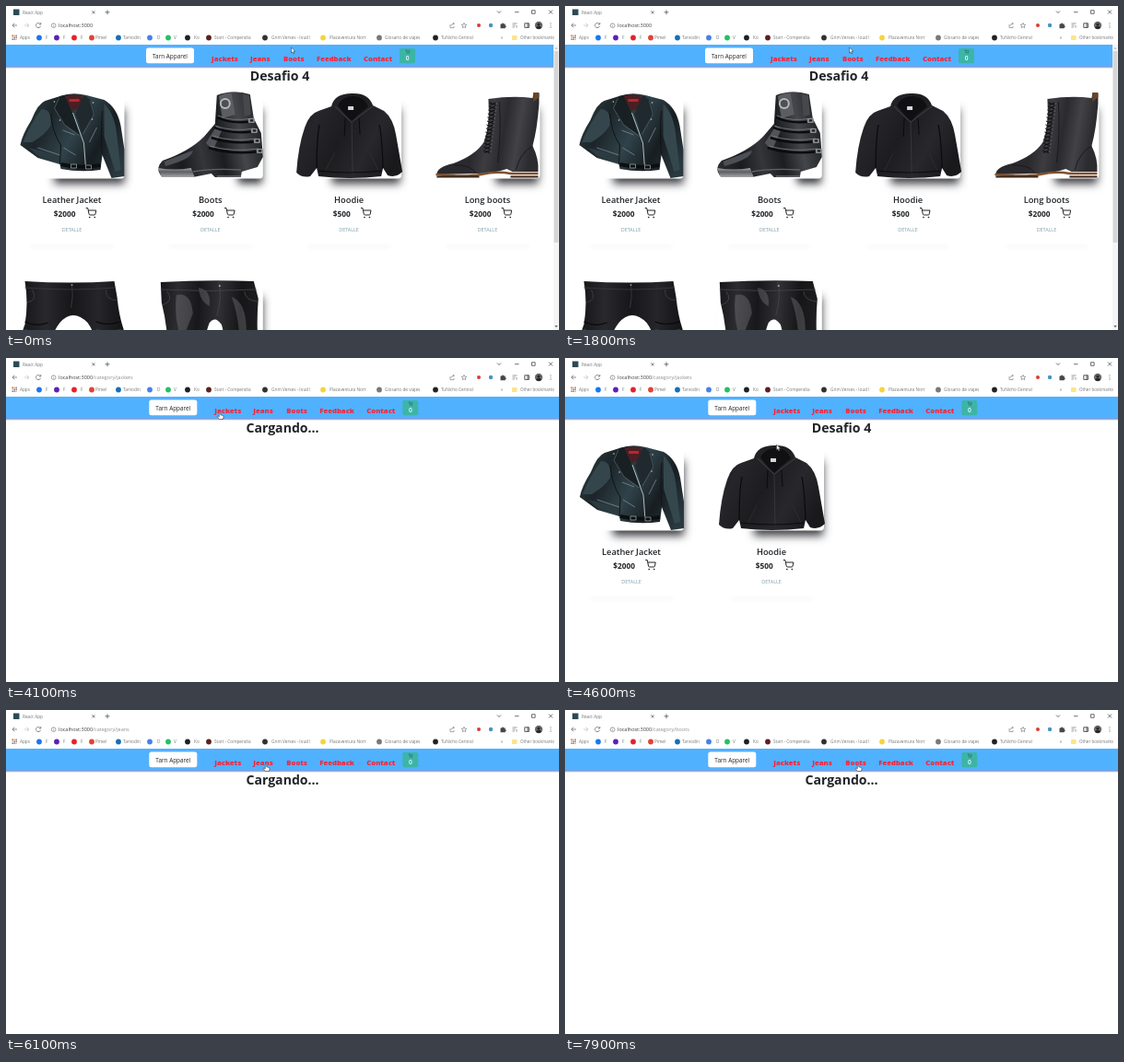
Write an HTML page with a canvas that moves like this. It is 600x352 px and loops after 8 s.

```html
<!DOCTYPE html>
<html lang="es">
<head>
<meta charset="utf-8">
<title>Desafio 4</title>
<style>
html, body { margin: 0; width: 100%; height: 100%; overflow: hidden; background: #fff; }
canvas { display: block; }
</style>
</head>
<body>
<canvas id="stage" width="600" height="352"></canvas>
<script>
const ctx = document.getElementById('stage').getContext('2d');
const LOOP = 8000;
const FONT = '"Open Sans", "Noto Sans", sans-serif';
const INK = '#212529';

function text(str, x, y, size, color = INK, weight = 400, align = 'left') {
  ctx.font = `${weight} ${size}px ${FONT}`;
  ctx.textAlign = align;
  ctx.fillStyle = color;
  ctx.fillText(str, x, y);
}
function rect(x, y, w, h, color, r = 0) {
  ctx.fillStyle = color;
  ctx.beginPath();
  ctx.roundRect(x, y, w, h, r);
  ctx.fill();
}
function dot(x, y, r, color) {
  ctx.fillStyle = color;
  ctx.beginPath();
  ctx.arc(x, y, r, 0, Math.PI * 2);
  ctx.fill();
}
function fill(d, color) {
  ctx.fillStyle = color;
  ctx.fill(new Path2D(d));
}
function line(d, color, width = 0.8) {
  ctx.strokeStyle = color;
  ctx.lineWidth = width;
  ctx.stroke(new Path2D(d));
}
function at(x, y, draw, scale = 1) {
  ctx.save();
  ctx.translate(x, y);
  ctx.scale(scale, scale);
  draw();
  ctx.restore();
}
function blend(x0, y0, x1, y1, ...colors) {
  const g = ctx.createLinearGradient(x0, y0, x1, y1);
  colors.forEach((c, i) => g.addColorStop(i / (colors.length - 1), c));
  return g;
}
// Blurred rectangle without its sharp body.
function shade(x, y, w, h, blur, color) {
  ctx.save();
  ctx.shadowColor = color;
  ctx.shadowBlur = blur;
  ctx.shadowOffsetX = 2000;
  ctx.fillRect(x - 2000, y, w, h);
  ctx.restore();
}

function jacket() {
  fill('M44 4 Q57-1 73 3 L92 8 Q106 16 110 36 L114 62 L114 91 L100 93 L90 68 L88 84 Q66 87 45 83 L44 78 L20 71 L1 57 Q3 46 13 30 Q20 12 28 9Z',
    blend(0, 20, 110, 80, '#2c3d42', '#1c2529', '#30434a', '#171d21', '#2a393f'));
  fill('M24 18 Q36 18 34 36 Q28 46 14 54 L4 54 Q12 34 24 18Z', '#34464c');
  fill('M92 12 Q104 24 106 48 L110 84 L104 86 L92 48Z', '#34474d');
  fill('M10 60 L44 68 L44 76 L22 70Z', '#2b3b40');
  fill('M48 4 Q58 0 69 5 L66 18 L53 20Z', '#4a1f24');
  fill('M54 7 H65 V10 H54Z', '#b8272c');
  fill('M44 4 L49 3 L57 21 L66 46 L48 34 L38 17Z', '#182023');
  fill('M70 3 L78 9 L82 24 L68 45 L61 23Z', '#20292d');
  line('M43 6 L38 17 L49 35 L65 47 M77 9 L81 24 L69 45', '#59686d', 0.7);
  line('M58 22 L70 55 L72 82', '#b5bec1', 1);
  line('M47 41 L60 46 M84 38 L76 54 M48 60 L61 68 M20 60 L44 68', '#7c8b90', 0.8);
  line('M34 23 Q36 44 45 57 L44 78 M90 20 Q88 48 90 66', '#0f1416', 1);
  line('M45 78 Q65 83 88 79', '#0b0f11', 4);
  line('M56 78 h6 v4 h-6z M72 79 h6 v4 h-6z', '#a9b0b2', 0.7);
  [[38, 10], [80, 11], [44, 30], [79, 29]].forEach(([x, y]) => dot(x, y, 0.8, '#c3cccf'));
}

function boots() {
  fill('M64 3 Q82-4 100 2 L104 28 L112 44 L114 70 L108 81 L91 86 L90 92 L62 92 L58 88 L38 92 L3 90 Q-3 82 5 74 Q34 64 50 48 L62 34Z',
    blend(0, 60, 112, 40, '#2b2c30', '#1a1b1e', '#34363a', '#1c1d20', '#44464b', '#222326'));
  fill('M66 4 Q74 0 80 1 L84 24 L70 28Z', '#5b5d62');
  fill('M92 2 L99 3 L101 24 L94 26Z', '#46484c');
  fill('M7 75 Q26 67 38 63 Q38 72 8 80Z', '#4c4f55');
  fill('M52 55 L64 36 L70 40 L60 62Z', '#505359');
  fill('M0 82 Q18 85 36 82 L40 92 L4 92Z', blend(0, 80, 0, 92, '#cfd1d3', '#5b5e62', '#a4a6a9'));
  line('M38 86 Q58 82 90 84', '#606368', 1.4);
  line('M64 91 H90', '#77797d', 1.2);
  for (let i = 0; i < 4; i++) {
    const y = 27 + i * 11;
    line(`M${64 - i * 3} ${y} Q80 ${y + 8} ${104 + i * 2} ${y + 4}`, '#0a0b0d', 2.4);
    line(`M${65 - i * 3} ${y - 2} Q80 ${y + 5} ${103 + i * 2} ${y + 1}`, '#74777c', 0.9);
    rect(98 + i * 3, y + 1, 7, 5, '#8b8e92', 1);
    rect(100 + i * 3, y + 2.2, 3.4, 2.4, '#202226');
  }
  dot(73, 12, 6, '#b5b7b9');
  dot(73, 12, 4, '#4c4f53');
}

function hoodie() {
  fill('M38 15 Q41 1 60 1 Q78 0 83 14 L95 20 Q105 28 108 46 L115 86 Q108 93 99 90 L94 82 L92 91 Q58 95 24 91 L22 82 L15 91 Q6 93 0 87 Q2 58 9 38 Q14 23 24 20Z',
    blend(0, 0, 114, 60, '#1b1b1e', '#26262a', '#1d1d20', '#28282c', '#19191c'));
  fill('M45 14 Q50 4 61 4 Q73 4 78 15 L66 25 L60 32 L53 24Z', '#101012');
  fill('M56 15 h6 v4 h-6z', '#d6d7d8');
  line('M42 15 Q52 25 60 32 Q70 24 83 15', '#38383c', 1.2);
  line('M60 32 L61 89', '#3c3c41', 0.8);
  line('M53 28 L52 48 M68 28 L69 46', '#0a0a0c', 1);
  line('M41 66 L31 86 M80 66 L89 85', '#303034', 0.8);
  line('M24 85 Q58 89 92 85 M22 82 Q22 50 25 35 M94 82 Q93 50 90 35', '#0b0b0d', 1.2);
}

function longBoots() {
  fill('M58 7 Q84 3 106 6 L107 0 L113 1 L113 12 Q111 40 106 58 Q113 72 112 86 L84 86 L78 83 Q64 88 46 88 L2 89 Q2 81 20 77 Q44 68 53 54 Q60 36 58 7Z',
    blend(50, 0, 112, 10, '#2a2a2e', '#3c3c41', '#2b2b2f', '#424247', '#2c2c30'));
  fill('M107 0 h6 v5 l-6 5z', '#6b4427');
  line('M1 89 Q34 92 50 89 Q67 85 82 88 H112', '#7d5230', 2.4);
  line('M2 91.4 H48 M82 91.4 H112', '#3b2414', 2);
  for (let i = 0; i < 14; i++) {
    const y = 11 + i * 4, x = 59 - i * 0.5;
    line(`M${x} ${y} l7 2.6 M${x + 7} ${y} l-6 2.6`, '#0c0c0e', 1);
    dot(x + 8, y + 1, 0.6, '#7b7c81');
  }
  line('M70 10 Q72 46 68 76 M106 58 Q92 66 88 84 M20 79 Q38 78 44 87', '#18181b', 0.9);
}

function blackJeans() {
  fill('M6 1 Q56 4 103 1 L106 18 Q108 38 113 53 Q116 76 114 92 L84 92 Q86 62 74 46 Q58 30 44 46 Q31 62 33 92 L2 92 Q-2 68 6 48 Q10 25 6 1Z',
    blend(0, 0, 114, 0, '#151518', '#28282d', '#17171a', '#25252a', '#131316'));
  line('M6 8 Q56 12 104 8', '#3c3c42', 0.8);
  line('M57 4 Q59 18 56 30 M14 10 Q20 22 9 24 M94 10 Q93 21 106 22', '#45454b', 0.7);
  for (let i = 0; i < 6; i++) {
    const y = 45 + i * 8;
    line(`M${6 - i * 0.8} ${y} q12 6 25 1 M${83 + i * 0.4} ${y} q12 5 27 0`, i % 2 ? '#37373d' : '#08080a', 1.2);
  }
  dot(57, 5, 1, '#8e8e94');
}

function leatherJeans() {
  fill('M3 2 Q54 -1 104 1 L109 20 Q106 55 111 88 Q92 92 73 88 Q73 60 69 48 Q62 38 56 46 Q49 64 48 93 L10 92 Q13 60 4 24Z',
    blend(0, 0, 114, 8, '#141416', '#2c2c30', '#18181b', '#303034', '#161618', '#202023'));
  const gloss = 'rgba(150,150,155,.3)';
  fill('M20 16 Q36 12 38 36 L26 66 Q17 42 20 16Z', gloss);
  fill('M80 18 Q97 24 96 60 L88 76 Q90 46 80 18Z', gloss);
  fill('M44 8 Q58 10 56 28 Q46 24 44 8Z', gloss);
  line('M3 10 Q54 13 107 10 M66 2 Q70 18 64 38', '#46464b', 0.8);
  line('M10 12 Q18 22 5 27 M94 12 Q95 22 108 23 M14 72 q16 6 32 2 M75 70 q14 6 32 2 M13 82 q14 4 32 1', '#47474c', 0.8);
  dot(67, 6, 1.1, '#a4a4a8');
}

// span: horizontal reach of the shadow under each picture
const JACKET = { name: 'Leather Jacket', price: '$2000', draw: jacket, span: [[37, 114]] };
const BOOTS = { name: 'Boots', price: '$2000', draw: boots, span: [[87, 113]] };
const HOODIE = { name: 'Hoodie', price: '$500', draw: hoodie, span: [[38, 113]] };
const LONG = { name: 'Long boots', price: '$2000', draw: longBoots, span: [[66, 113]] };
const BLACK = { name: 'Black Jeans', price: '$800', draw: blackJeans, span: [[12, 32], [70, 104]] };
const LEATHER = { name: 'Leather Jeans', price: '$1200', draw: leatherJeans, span: [[9, 114]] };

const cart = color => {
  line('M1 1h4l2.7 13.4a2 2 0 0 0 2 1.6h9.7a2 2 0 0 0 2-1.6L23 6H6', color, 2);
  dot(9, 21, 1.7, color);
  dot(20, 21, 1.7, color);
};

function card(item, cx, y) {
  at(cx - 57, y, () => {
    for (const [a, b] of item.span) shade(a, 18, b - a, 81, 9, 'rgba(25,27,33,.85)');
    rect(0, 0, 114, 93.5, '#fff', 4);
    item.draw();
  });
  shade(cx - 45, y + 167.3, 90, 0.7, 4, 'rgba(0,0,0,.14)');
  text(item.name, cx, y + 119.5, 9.3, INK, 600, 'center');
  ctx.font = `700 8.3px ${FONT}`;
  const w = ctx.measureText(item.price).width;
  const left = cx + 3.7 - (w + 23) / 2;
  text(item.price, left, y + 134.5, 8.3, INK, 700);
  at(left + w + 10.7, y + 125, () => cart(INK), 0.5);
  text('DETALLE', cx, y + 151, 5.4, '#7d9aaa', 400, 'center');
}

const marks = [
  [36, '#1877f2', 'F', 43], [55, '#5f1fb5', 'F', 62], [74, '#e8222b', 'F', 81],
  [93, '#df4436', 'Pimel', 97], [122, '#1470b8', 'Tarvodin', 127], [156, '#4a80e8', 'D', 164],
  [176, '#25c25f', 'V', 182], [197, '#1d2125', 'Ko', 204], [220, '#5c211e', 'Start - Compendia', 226],
  [281, '#35322e', 'Grim Verses - loud l', 288], [344, '#f5d343', 'Plazaventura Nort', 351],
  [405, '#77797c', 'Glosario de viajes', 411], [466, '#202225', 'TuNicho Central', 472]
];

function browser(path) {
  rect(0, 0, 600, 42, '#fff');
  const gray = '#6c7075', label = '#72767a';
  rect(8, 3.5, 6.5, 6.5, '#2c4a55');
  text('React App', 18, 8.7, 4.7, label);
  line('M93.4 5.3l3 3m0-3l-3 3 M107.5 6.8h5 M110 4.3v5', '#3c4043', 0.7);
  line('M533 5.5l2 2 2-2 M552 6.7h4.5 M570.5 4.7h3.6v3.6h-3.6z M589 4.5l4 4m0-4l-4 4', '#333', 0.7);

  line('M12 21H7m2.3-2.3L7 21l2.3 2.3', gray);
  line('M20 21h5m-2.3-2.3L25 21l-2.3 2.3', '#c3c6c9');
  line('M37.3 19.6a2.6 2.6 0 1 0 .3 2.2 M37.8 18v2h-2', gray);
  line('M54 21.2a2.4 2.4 0 1 1-4.8 0a2.4 2.4 0 1 1 4.8 0 M51.6 20.8v1.7 M51.6 19.4v.6', gray, 0.6);
  text('localhost:3000', 57, 23.2, 5.5, '#3a3d41');
  const hostWidth = ctx.measureText('localhost:3000').width;
  text(path, 57 + hostWidth, 23.2, 5.5, '#8a8e92');

  line('M482 20v3.6h4V22 M483 21.6q.5-2.4 3.2-2.5m-1.2-1.2l1.4 1.2-1.4 1.2', gray, 0.6);
  line('M497 18.4l.8 1.8 2 .2-1.5 1.3.5 2-1.8-1.1-1.8 1.1.5-2-1.5-1.3 2-.2z', gray, 0.6);
  dot(513, 21, 2, '#d83c36');
  dot(526, 21, 2.2, '#4695bd');
  fill('M536.5 19.5h1.6a1 1 0 0 1 2 0h1.6v1.7a1 1 0 0 1 0 2v1h-5.2z', '#43474b');
  line('M549.5 19h5 M549.5 21h3 M549.5 23h2.4 M554 21v2.6', gray, 0.7);
  line('M562.8 18.8h4.6v4.6h-4.6z M566 18.8v4.6', '#3f4347', 0.9);
  dot(578, 21, 4.2, '#6b6a69');
  dot(578, 20, 1.6, '#252525');
  fill('M574.8 23.5q3.2-3.5 6.4 0q-3.2 3-6.4 0z', '#252525');
  [18.8, 21, 23.2].forEach(y => dot(591, y, 0.6, gray));

  const palette = ['#dc4b3e', '#f0b52a', '#4285e8'];
  for (let i = 0; i < 9; i++) rect(6.5 + (i % 3) * 2, 31.6 + Math.floor(i / 3) * 2, 1.4, 1.4, palette[(i + Math.floor(i / 3)) % 3]);
  text('Apps', 15, 36, 4.7, label);
  for (const [x, color, name, tx] of marks) {
    dot(x, 34.5, 2.9, color);
    text(name, tx, 36, 4.7, label);
  }
  text('»', 536.8, 36, 5, label);
  rect(549, 32, 5.5, 5, '#fbe48c', 0.6);
  text('Other bookmarks', 558, 36, 4.5, label);
}

const links = [['Jackets', 223, 30], ['Jeans', 265, 23], ['Boots', 301, 23], ['Feedback', 337, 38], ['Contact', 388, 31]];

function navbar(shift) {
  rect(0, 42, 600, 24.4, '#50b1ff');
  rect(0, 66, 600, 1.2, '#f28da6');
  rect(152 + shift, 45.5, 52, 16.7, '#fff', 2.5);
  text('Tarn Apparel', 178 + shift, 56.6, 6.4, INK, 500, 'center');
  for (const [label, x] of links) text(label, x + shift, 60, 7.7, '#fb2238', 800);
  rect(427 + shift, 46, 17, 16.3, '#3cb5a6', 2);
  at(433.3 + shift, 47.4, () => cart('#24434a'), 0.2);
  text('0', 435.6 + shift, 58.6, 6.6, '#fff', 600, 'center');
}

function scrollbar() {
  rect(594, 42, 6, 310, '#f5f5f5');
  rect(594.6, 49, 4.8, 208, '#d6d6d6');
  fill('M595.3 46.7l1.7-2 1.7 2z', '#bbb');
  fill('M595.3 347.3l1.7 2 1.7-2z', '#505050');
}

// Each view starts at its time and lasts until the next one.
const views = [
  { from: 0, path: '', items: [JACKET, BOOTS, HOODIE, LONG, BLACK, LEATHER] },
  { from: 3900, path: '/category/jackets' },
  { from: 4300, path: '/category/jackets', items: [JACKET, HOODIE] },
  { from: 6000, path: '/category/jeans' },
  { from: 6400, path: '/category/jeans', items: [BLACK, LEATHER] },
  { from: 7800, path: '/category/boots' }
];

const track = [
  [0, 309.5, 45], [1800, 308.5, 45], [2500, 263, 62], [3200, 225.5, 65], [3600, 232, 59],
  [4300, 232, 59], [4600, 229.5, 94], [4900, 230, 95], [5500, 277, 65], [5800, 282, 59],
  [6400, 282, 59], [6800, 306.5, 99], [7150, 309, 94], [7600, 318, 59], [LOOP, 318, 59]
];

function pointer(t) {
  const i = track.findIndex(k => k[0] > t);
  const [t0, x0, y0] = track[i - 1], [t1, x1, y1] = track[i];
  const p = (t - t0) / (t1 - t0), e = p * p * (3 - 2 * p);
  return [x0 + (x1 - x0) * e, y0 + (y1 - y0) * e];
}

function cursor(x, y, shift) {
  const over = y > 51 && y < 64 && links.some(([, lx, w]) => x > lx + shift && x < lx + shift + w);
  const shape = over
    ? 'M-.7 0q.8-.8 1.4 0v2.8l2.5.6q1 .4.8 1.5l-.5 2.6H-.6L-2.8 4.7q.2-1 1.2-.4l.9.6z'
    : 'M0 0v6l1.4-1.2 1 2.3 1-.5-1-2.2h1.9z';
  at(x, y, () => {
    fill(shape, '#fff');
    line(shape, '#3a3a40', 0.6);
  });
}

function render(t) {
  const view = views.findLast(v => v.from <= t);
  const home = view.path === '';
  const shift = home ? 0 : 3.3;
  rect(0, 0, 600, 352, '#fff');
  if (view.items) {
    const first = home ? 71.5 : 72, pitch = home ? 150.3 : 152;
    view.items.forEach((item, i) => card(item, first + (i % 4) * pitch, 94 + Math.floor(i / 4) * 204));
  }
  browser(view.path);
  navbar(shift);
  text(view.items ? 'Desafio 4' : 'Cargando...', home ? 297 : 300, 81.2, 14.1, INK, 700, 'center');
  if (home) scrollbar();
  const [x, y] = pointer(t);
  cursor(x, y, shift);
}

let start;
function tick(now) {
  start ??= now;
  render((now - start) % LOOP);
  requestAnimationFrame(tick);
}
render(0);
requestAnimationFrame(tick);
</script>
</body>
</html>
```
